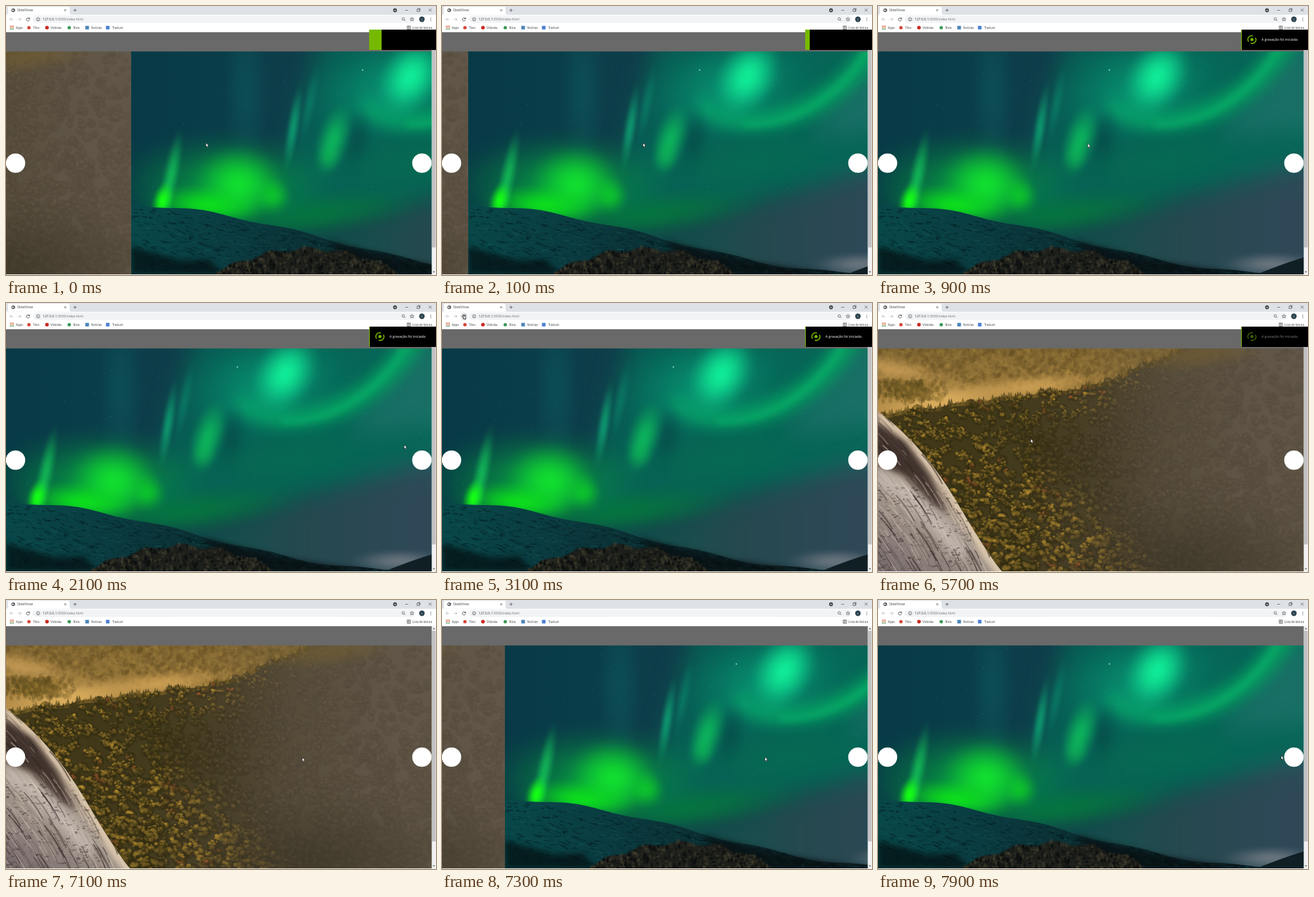
An HTML page with a canvas for the animation above (8000 ms loop, 656 px wide and 410 px high).

```html
<!DOCTYPE html>
<html lang="pt">
<head>
<meta charset="utf-8">
<title>SlideShow</title>
<style>
  html, body { margin: 0; width: 100%; height: 100%; overflow: hidden; background: #fff; }
  #stage { position: relative; width: 656px; height: 410px; overflow: hidden; }
  #strip { position: absolute; left: 0; top: 69px; width: 1300px; height: 340px; }
  #strip canvas { position: absolute; top: 0; left: 0; }
  #strip canvas + canvas { left: 650px; }
  svg { position: absolute; left: 0; top: 0; }
  text { font-family: "Open Sans", "Noto Sans", sans-serif; font-size: 4.6px; fill: #3c4043; }
  .wide { font-size: 5.1px; }
  .narrow { font-size: 4.4px; }
  .thin { fill: none; stroke: #4a4d51; stroke-width: .7; }
</style>
</head>
<body>
<div id="stage">
  <div id="strip">
    <canvas id="forest" width="650" height="340"></canvas>
    <canvas id="aurora" width="650" height="340"></canvas>
  </div>
  <svg width="656" height="410" viewBox="0 0 656 410">
    <!-- tab strip -->
    <rect width="656" height="14" fill="#dee1e6"/>
    <path d="M0 13.5Q3 13 3 10V3Q3 1 5 1H95Q97 1 97 3V10Q97 13 100 13.5Z" fill="#fff"/>
    <circle cx="11" cy="6.5" r="2.8" fill="#4d5156"/>
    <path d="M9.3 5.5l2 .4-.4 1.6-1.2-.4zM11.5 7.6l1.3-.6" stroke="#fff" stroke-width=".5" fill="#fff"/>
    <text x="17" y="8.2" class="wide">SlideShow</text>
    <path class="thin" d="M88.8 5l3 3m0-3l-3 3M102.8 6.5h5m-2.5-2.5v5M609 6.5h4.5M645 4.2l4.2 4.2m0-4.2l-4.2 4.2M627 5h3.5v3.5H627zM628.2 5V3.8h3.5v3.5h-1.2"/>
    <circle cx="593.5" cy="6.5" r="2.9" fill="#3c4043"/>
    <path d="M592 6h3l-1.5 1.7z" fill="#fff"/>
    <!-- toolbar -->
    <rect y="13.5" width="656" height="27" fill="#fff"/>
    <rect x="41" y="14.7" width="584" height="11" rx="5.5" fill="#f1f3f4"/>
    <circle id="hover" cx="33.5" cy="20.3" r="5.3" fill="#dcdee0"/>
    <path d="M11 20.3H6m2.3-2.3L6 20.3l2.3 2.3M18 20.3h5m-2.3-2.3l2.3 2.3-2.3 2.3" fill="none" stroke="#b4b7ba" stroke-width=".8"/>
    <path d="M35.6 19.2a2.4 2.4 0 1 0 .3 1.7M36 17.6v1.9h-1.9" fill="none" stroke="#44474b" stroke-width=".9"/>
    <g class="thin">
      <circle cx="49" cy="20.3" r="2.5"/>
      <path d="M49 19.8v1.8m0-2.9v.5"/>
      <circle cx="606" cy="19.7" r="1.9"/>
      <path d="M607.4 21.1l1.8 1.8"/>
      <path d="M619.3 17.4l.8 1.9 2 .1-1.5 1.3.5 2-1.8-1.1-1.8 1.1.5-2-1.5-1.3 2-.1z"/>
    </g>
    <text x="56" y="22.2" class="wide">127.0.0.1<tspan fill="#70757a">:5500/index.html</tspan></text>
    <circle cx="634.5" cy="20.3" r="4.2" fill="#2d4351"/>
    <text x="633.4" y="21.9" style="font-size:4px;fill:#fff">L</text>
    <path d="M648 18v5" stroke="#44474b" stroke-width="1" stroke-dasharray="1 1"/>
    <!-- bookmarks -->
    <g stroke-width="1.4" stroke-dasharray="1.4 .9">
      <path d="M6 30.8h6" stroke="#d9493c"/><path d="M6 33h6" stroke="#c98a35"/><path d="M6 35.2h6" stroke="#4c8d5c"/>
    </g>
    <circle cx="35" cy="33" r="2.6" fill="#d44638"/>
    <circle cx="62.5" cy="33" r="2.8" fill="#cc2a25"/>
    <circle cx="96.5" cy="33" r="2.6" fill="#3a9a56"/>
    <rect x="121" y="30.3" width="5.6" height="5.4" fill="#4f86b8"/>
    <rect x="152.5" y="30.3" width="5.4" height="5.4" fill="#4a7fd0"/>
    <text x="15" y="34.5">Apps</text>
    <text x="41" y="34.5">Tilvo</text>
    <text x="68" y="34.5">Vidoska</text>
    <text x="102.5" y="34.5">Rota</text>
    <text x="130" y="34.5" class="narrow">Notícias</text>
    <text x="162" y="34.5" class="narrow">Traduzir</text>
    <text x="620" y="34.5" class="narrow">Lista de leitura</text>
    <path class="thin" d="M612 30.5h5v5h-5zM613.7 30.5v5M614.5 32h2m-2 1.6h2"/>
    <!-- page furniture -->
    <rect y="40" width="650" height="29.3" fill="#696969"/>
    <rect y="409" width="656" height="1" fill="#f4f4f4"/>
    <rect x="649.5" y="40" width="6.5" height="370" fill="#f1f1f1"/>
    <rect x="650" y="47" width="5.5" height="321" fill="#c1c1c1"/>
    <path d="M651 44.5l1.8-2 1.8 2zM651 404.5l1.8 2 1.8-2z" fill="#555"/>
    <g fill="#fff"><circle cx="14.5" cy="239.5" r="14.8"/><circle cx="634.5" cy="239.5" r="14.8"/></g>
    <!-- recording notice -->
    <rect id="accent" y="36" width="102" height="31" fill="#76b900"/>
    <rect id="panel" y="36" width="102" height="31" fill="#000"/>
    <g id="notice">
      <path d="M565.4 54.3A5.6 5.6 0 0 1 572 45.8M575.6 48.3A5.6 5.6 0 0 1 568.6 56.5" fill="none" stroke="#76b900" stroke-width="1.5"/>
      <circle cx="570.5" cy="51.2" r="2.4" fill="#76b900"/>
      <text x="585" y="53.4" style="font-size:5.3px;fill:#fff">A gravação foi iniciada</text>
    </g>
    <path id="cursor" d="M0 0V6.2L1.4 5 2.4 7.2 3.5 6.7 2.5 4.6H4.4Z" fill="#fff" stroke="#111" stroke-width=".6"/>
  </svg>
</div>
<script>
const $ = id => document.getElementById(id);
const clamp = v => Math.max(0, Math.min(1, v));
const ramp = (v, from, to) => clamp((v - from) / (to - from));
const smooth = k => k * k * (3 - 2 * k);

function seeded(seed) {
  return () => {
    seed = (seed * 1664525 + 1013904223) >>> 0;
    return seed / 4294967296;
  };
}

// The CSS "ease" curve, its parameter found by bisection.
function ease(x) {
  let low = 0, high = 1;
  for (let i = 0; i < 20; i++) {
    const s = (low + high) / 2;
    if (.75 * s * (1 - s) + s ** 3 < x) low = s; else high = s;
  }
  return .3 * low * (1 - low) ** 2 + 3 * low ** 2 * (1 - low) + low ** 3;
}

function scene(id) {
  const c = $(id).getContext('2d');
  c.translate(0, -69);
  return c;
}

function fade(c, x0, y0, x1, y1, ...colors) {
  const g = c.createLinearGradient(x0, y0, x1, y1);
  colors.forEach((color, i) => g.addColorStop(i / (colors.length - 1), color));
  return g;
}

function shape(c, d, fill, blur = 0) {
  c.filter = blur ? `blur(${blur}px)` : 'none';
  c.fillStyle = fill;
  c.fill(new Path2D(d));
  c.filter = 'none';
}

function line(c, d, color, width, blur = 0) {
  c.filter = blur ? `blur(${blur}px)` : 'none';
  c.strokeStyle = color;
  c.lineWidth = width;
  c.stroke(new Path2D(d));
  c.filter = 'none';
}

function blob(c, x, y, rx, ry, color) {
  c.fillStyle = color;
  c.beginPath();
  c.ellipse(x, y, rx, ry, 0, 0, 7);
  c.fill();
}

// Soft elliptical light with a bell-shaped falloff.
function glow(c, x, y, rx, ry, tilt, rgb, alpha) {
  const g = c.createRadialGradient(0, 0, 0, 0, 0, 1);
  for (let k = 0; k <= 1; k += .125) g.addColorStop(k, `rgba(${rgb},${alpha * (1 - smooth(k))})`);
  c.save();
  c.translate(x, y);
  c.rotate(tilt);
  c.scale(rx, ry);
  c.fillStyle = g;
  c.fillRect(-1, -1, 2, 2);
  c.restore();
}

// Outline of the land below a skyline given as a function of x.
function land(skyline) {
  let d = 'M0 410';
  for (let x = 0; x <= 650; x += 5) d += `L${x} ${skyline(x)}`;
  return d + 'V410Z';
}

function paintAurora() {
  const c = scene('aurora'), rnd = seeded(7);
  c.fillStyle = fade(c, 0, 69, 650, 69, '#073a46', '#0a3e49', '#133c4a', '#0b5650', '#1d6460');
  c.fillRect(0, 69, 650, 340);
  shape(c, 'M290 40H680V235L420 305 210 330 240 220 268 120Z', 'rgba(4,104,88,.8)', 18);
  shape(c, 'M250 360L450 300 680 236V430H250Z', fade(c, 290, 330, 640, 330, '#10504b', '#26484f', '#2f4858'), 18);
  shape(c, 'M625 60H680V185L520 200Z', 'rgba(42,120,114,.5)', 16);
  glow(c, 175, 130, 40, 150, 0, '14,98,100', .4);

  // the great arc and its bright core
  line(c, 'M630 40C585 135 490 186 405 172Q375 165 355 145', 'rgba(6,165,98,.9)', 30, 11);
  line(c, 'M612 62C570 138 490 186 420 180', 'rgba(8,185,108,.5)', 10, 5);
  glow(c, 400, 125, 150, 90, -.2, '8,155,118', .7);
  glow(c, 426, 108, 52, 72, .55, '16,240,152', .95);
  glow(c, 345, 208, 28, 60, .1, '5,72,70', .6);
  glow(c, 308, 205, 30, 66, .3, '12,190,92', .85);
  glow(c, 302, 230, 22, 28, .2, '14,190,85', .5);
  glow(c, 247, 186, 12, 76, .16, '14,170,118', .75);
  glow(c, 272, 150, 12, 70, .2, '10,140,110', .5);
  glow(c, 420, 240, 170, 60, -.15, '6,112,78', .5);

  // low curtain over the mountain
  glow(c, 145, 275, 190, 95, 0, '6,150,65', .9);
  glow(c, 165, 272, 80, 68, .1, '18,230,45', .9);
  glow(c, 115, 304, 100, 36, .08, '12,230,25', .9);
  glow(c, 216, 290, 32, 36, -.4, '12,205,40', .8);
  glow(c, 60, 262, 15, 84, .2, '20,200,90', .75);
  glow(c, 48, 297, 18, 34, .25, '20,255,20', 1);
  glow(c, 290, 318, 190, 42, -.15, '4,128,58', .7);

  for (let i = 0; i < 90; i++) {
    c.fillStyle = `rgba(150,205,205,${.1 + rnd() * .35})`;
    c.fillRect(rnd() * 650, 70 + rnd() * 240, .9, .9);
  }
  blob(c, 353, 97.5, 1.1, 1.1, '#8fe5cf');

  glow(c, 600, 394, 85, 22, 0, '135,138,145', .65);
  const ridge = x => 304 + 103 * smooth(clamp(x / 600)) + 2 * Math.sin(x / 23);
  shape(c, land(ridge), fade(c, 0, 305, 500, 410, '#08484a', '#0a3b40', '#0b2c2f', '#101f24'));
  shape(c, 'M575 410Q620 392 650 383V410Z', '#101f24');
  for (let i = 0; i < 1900; i++) {
    const x = rnd() * 650, top = ridge(x), y = top + 2 + rnd() * (409 - top), w = 2 + rnd() * 9;
    const color = rnd() < .65 ? `rgba(2,20,24,${.1 + rnd() * .4})` : `rgba(30,98,96,${rnd() * .35})`;
    line(c, `M${x} ${y}l${w} ${w * (rnd() * .6 - .05)}`, color, .6 + rnd() * 1.6);
  }
  shape(c, 'M0 366L75 388 118 386 140 409H0Z', 'rgba(5,13,15,.7)', 4);
  shape(c, 'M300 357L420 388 560 409H350Z', 'rgba(8,15,18,.75)', 4);

  // rocks in front
  const rocks = x => 370 + ((x - 270) / 22) ** 2 * .9 + 3 * Math.sin(x / 9);
  shape(c, land(rocks), '#1d1f1b', 1);
  for (let i = 0; i < 700; i++) {
    const x = 130 + rnd() * 270, top = rocks(x), y = top + rnd() * (409 - top);
    blob(c, x, y, 1 + rnd() * 2, 1 + rnd() * 3,
      rnd() < .5 ? `rgba(84,78,56,${rnd() * .4})` : `rgba(4,8,9,${rnd() * .6})`);
  }
}

function paintForest() {
  const c = scene('forest'), rnd = seeded(21);
  const mix = (a, b, k) => a.map((v, i) => v + (b[i] - v) * k);
  const rgba = (rgb, alpha) => `rgba(${rgb.map(Math.round)},${alpha})`;

  // misty valley
  c.fillStyle = fade(c, 0, 69, 0, 165, '#7d6430', '#927338', '#b18946');
  c.fillRect(0, 69, 650, 340);
  for (let i = 0; i < 1500; i++) {
    const y = 69 + rnd() * 62, r = 1.5 + rnd() * 3;
    blob(c, rnd() * 470, y, r, r, rnd() < .6 ? 'rgba(88,70,32,.2)' : 'rgba(182,140,66,.16)');
  }
  glow(c, 25, 102, 110, 26, .2, '212,166,92', .7);
  glow(c, 95, 150, 130, 34, -.1, '226,180,98', .85);
  glow(c, 235, 127, 130, 22, -.1, '212,165,88', .8);
  for (let i = 0; i < 500; i++) {
    const x = 46 + (rnd() + rnd() - 1) * 60, y = 134 + (rnd() + rnd() - 1) * 20, r = 1.5 + rnd() * 2.5;
    blob(c, x, y, r, r * 1.3, rnd() < .55 ? 'rgba(92,76,30,.3)' : 'rgba(150,118,50,.25)');
  }

  // wooded slope, lit along the skyline and beside the granite
  const ridge = x => Math.min(170 - .13 * x, 127 - .42 * (x - 330)) + 2 * Math.sin(x / 11);
  const light = (x, y) => Math.max(
    ramp(x, y * 1.15, y * 1.15 - 90),
    ramp(y - ridge(x), 65, 15) * ramp(x, 540, 300));
  shape(c, land(ridge), fade(c, 150, 200, 560, 260, '#403818', '#4a412a', '#5b5142'));
  for (let x = 0; x < 500; x += 3.5) {
    const h = 5 + rnd() * 10, y = ridge(x) + 5;
    shape(c, `M${x - 4} ${y}L${x} ${y - h}L${x + 4} ${y}Z`, rgba(mix([66, 56, 24], [126, 100, 40], rnd()), .8));
  }
  const count = 2100, dabs = 14;
  for (let i = 0; i < count; i++) {
    const x = rnd() * 660 - 5, y = 68 + 350 * i / count;
    if (y < ridge(x)) continue;
    const warm = ramp(x, 430, 230), lit = light(x, y) * (.35 + .65 * rnd());
    const r = 3.5 + (y - 66) / 70 + rnd() * 2.5;
    const shade = mix([73, 64, 49], [50, 43, 18], warm);
    const sun = mix(mix([110, 97, 73], [104, 88, 42], warm), rnd() < .07 ? [182, 94, 46] : [202, 156, 52], lit);
    blob(c, x, y, r, r, rgba(shade, .55));
    for (let k = 0; k < dabs; k++) {
      const v = k / dabs, size = r * (.16 + rnd() * .22);
      blob(c, x + r * (.3 - .6 * v + (rnd() - .5) * 1.3), y + r * (.5 - v + (rnd() - .5) * .8),
        size, size * .85, rgba(mix(shade, sun, v), .25 + .4 * lit));
    }
  }
  c.fillStyle = fade(c, 330, 240, 650, 190, 'rgba(102,90,74,0)', 'rgba(101,90,75,.35)', 'rgba(103,92,79,.5)');
  c.fillRect(0, 69, 650, 340);
  glow(c, 460, 410, 260, 130, -.1, '48,44,30', .5);
  glow(c, 490, 78, 130, 30, -.1, '128,102,42', .4);

  // granite slope
  c.save();
  c.clip(new Path2D('M0 165Q68 215 120 303T190 410H0Z'));
  c.fillStyle = fade(c, 120, 240, 10, 410, '#a8927c', '#a3968b', '#75696a');
  c.fillRect(0, 150, 200, 260);
  line(c, 'M0 172Q70 218 125 315T195 415', 'rgba(236,214,184,.8)', 14, 4);
  shape(c, 'M-5 180L42 212 78 262 106 322 80 306 40 264 -5 246Z', '#40322c', 4);
  line(c, 'M-5 262Q60 290 130 385', 'rgba(205,196,188,.7)', 26, 8);
  for (let i = 0; i < 420; i++) {
    const x = rnd() * 220 - 50, y = 160 + rnd() * 245, len = 6 + rnd() * 26;
    const slope = .6 + (x + y * .5) / 220;
    const color = rnd() < .55 ? `rgba(42,33,30,${rnd() * .6})` : `rgba(228,211,192,${rnd() * .5})`;
    line(c, `M${x} ${y}q${len * .5} ${len * .35 * slope} ${len} ${len * slope}`, color, .5 + rnd() * 1.7);
  }
  for (let i = 0; i < 400; i++) {
    blob(c, rnd() * 150, 280 + rnd() * 130, .8 + rnd() * 3, .5 + rnd() * 1.2, `rgba(52,42,42,${rnd() * .45})`);
  }
  c.restore();
}

// Pointer stops: arrival time, then place.
const stops = [[0, 305, 208.5], [900, 320, 209.5], [1300, 320, 209.5], [2000, 596, 205], [2300, 630, 238],
  [2900, 32.5, 18.5], [3100, 32.5, 18.5], [3500, 233, 207], [5700, 233, 207], [6500, 300, 216],
  [7100, 452, 240], [7900, 615, 237]];

function pointerAt(t) {
  const i = Math.max(1, stops.findIndex(stop => stop[0] >= t));
  const [from, x0, y0] = stops[i - 1], [to, x1, y1] = stops[i];
  const k = ramp(t, from, to);
  return [x0 + (x1 - x0) * k, y0 + (y1 - y0) * k];
}

const RELOAD = 3300, SLIDE_START = 7100, SLIDE_TIME = 360;

function frame() {
  const t = Math.floor(performance.now() % 8000 / 100) * 100;
  const since = t < RELOAD ? t + 150 : t - SLIDE_START;
  $('strip').style.transform = `translateX(${Math.round(-650 * ease(clamp(since / SLIDE_TIME)))}px)`;
  $('cursor').setAttribute('transform', `translate(${pointerAt(t)})`);
  $('accent').setAttribute('x', 554 + 102 * ramp(t, 6000, 6300));
  $('panel').setAttribute('x', 573 - 18 * ramp(t, 0, 150) + 101 * ramp(t, 5700, 6000));
  $('notice').setAttribute('opacity', ramp(t, 100, 400) - ramp(t, 5600, 5800));
  $('hover').setAttribute('opacity', t >= 2900 && t < RELOAD ? 1 : 0);
  requestAnimationFrame(frame);
}

paintForest();
paintAurora();
frame();
</script>
</body>
</html>
```
